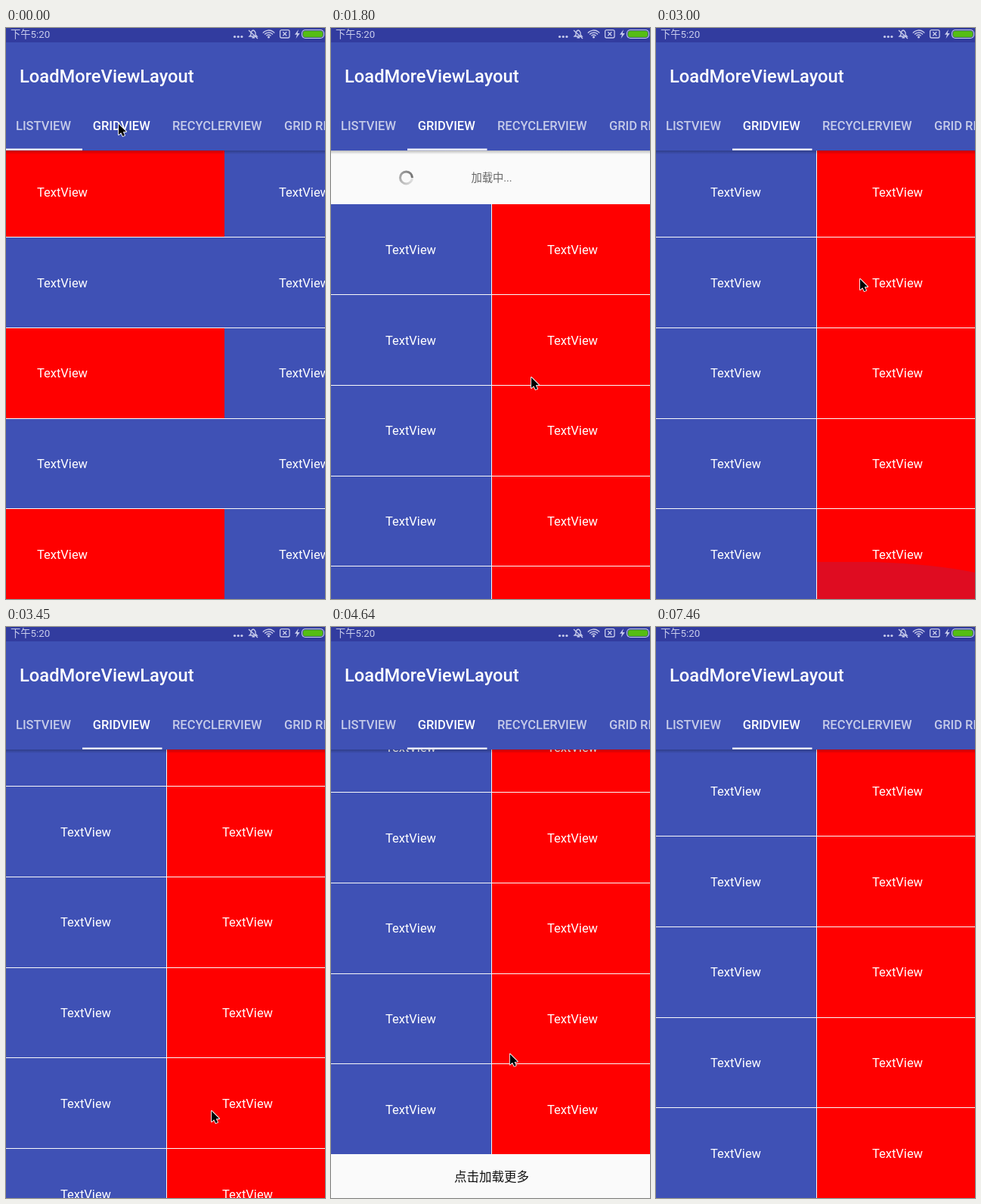
Recreate the animation shown at these times as an HTML page with a canvas. Size 422 by 755 pixels, loop 7.71 s.

```html
<!DOCTYPE html>
<html lang="zh">
<head>
<meta charset="utf-8">
<title>LoadMoreViewLayout</title>
<style>
  html, body { margin: 0; width: 100%; height: 100%; overflow: hidden; background: #fafafa; }
  canvas { display: block; width: 100vw; height: 100vh; }
</style>
</head>
<body>
<canvas id="stage"></canvas>
<script>
const W = 422, H = 755, LOOP = 7710;
const BLUE = '#3f51b5', RED = '#ff0000', PAPER = '#fafafa';
const LATIN = 'Roboto, "Noto Sans", sans-serif';
const CJK = 'Roboto, "Noto Sans CJK SC", "Noto Sans CJK", sans-serif';
const BAR_BOTTOM = 162, LIST_TOP = 157.4, ROW = 119.75, ROWS = 10;

const canvas = document.getElementById('stage');
const ctx = canvas.getContext('2d');

// Each move: first step, last step, value to reach.
const PULL = [[4, 7, 113.6], [9, 11, 76], [15, 18, 0]];
const SCROLL = [...PULL, [20, 26, -726.7], [29, 31, -656.7], [39, 45, 0]];
const POINTER = [
  [1, 6, 257, 474], [7, 12, 265, 462], [16, 19, 268, 700], [19, 20, 270, 332],
  [22, 23, 272, 640], [23, 26, 264, 363], [30, 33, 215, 726], [34, 37, 286, 568],
  [39, 42, 292, 790]
];
const HEADER = [[0, '下拉刷新'], [6, '释放刷新'], [11, '加载中...'], [15, '刷新成功']];
const FOOTER = [[0, '点击加载更多'], [34, '正在加载...'], [38, '加载成功']];

// The picture holds between steps of about 150 ms.
function stepAt(t) {
  if (t < 3300) return Math.floor(t / 150);
  const count = (from, max) => Math.min(max, Math.floor((t - from + 6) / 148.67));
  if (t < 6120) return 22 + count(3300, 15);
  return t < 6420 ? 38 : 39 + count(6420, 7);
}

const easeOut = p => 1 - (1 - p) ** 2;

function glide(rest, moves, step) {
  let values = rest;
  for (const [from, to, ...goal] of moves) {
    if (step <= from) break;
    const p = easeOut(Math.min(1, (step - from) / (to - from)));
    values = values.map((v, i) => v + (goal[i] - v) * p);
  }
  return values;
}

const held = (captions, step) => captions.filter(c => c[0] <= step).pop()[1];

function rect(color, x, y, w, h) {
  ctx.fillStyle = color;
  ctx.fillRect(x, y, w, h);
}

function text(str, x, y, font, color = '#fff', align = 'left') {
  ctx.font = font;
  ctx.fillStyle = color;
  ctx.textAlign = align;
  ctx.fillText(str, x, y);
}

function line(...points) {
  ctx.beginPath();
  points.forEach(([x, y], i) => i ? ctx.lineTo(x, y) : ctx.moveTo(x, y));
}

function dot(x, y, r) {
  ctx.beginPath();
  ctx.arc(x, y, r, 0, Math.PI * 2);
  ctx.fill();
}

// Rows snap to whole pixels and leave a one pixel divider below.
function cell(color, x, top, w, labelX) {
  const y = Math.round(top);
  rect(color, x, y, w, Math.round(top + ROW) - 1 - y);
  text('TextView', labelX, top + 65.4, '16.5px ' + LATIN, '#fff', 'center');
}

function drawListPage(x) {
  for (let r = 0; r < 5; r++) {
    cell(r % 2 ? BLUE : RED, x, LIST_TOP + r * ROW, W, x + 207.5);
  }
}

function drawPullArrow(y, angle) {
  ctx.save();
  ctx.translate(100, y);
  ctx.rotate(angle);
  for (let i = 0; i < 5; i++) {
    rect(`rgba(150,150,150,${.15 + i * .13})`, -3, -11 + i * 3, 6, 2.3);
  }
  ctx.fillStyle = '#b4b4b4';
  line([-7, 3], [7, 3], [0, 11]);
  ctx.fill();
  ctx.restore();
}

function drawSpinner(y, angle) {
  const shade = ctx.createConicGradient(angle, 99.5, y);
  shade.addColorStop(0, '#e6e6e6');
  shade.addColorStop(1, '#707070');
  ctx.strokeStyle = shade;
  ctx.lineWidth = 3;
  ctx.beginPath();
  ctx.arc(99.5, y, 8, 0, Math.PI * 2);
  ctx.stroke();
}

function drawPullHeader(step, y) {
  text(held(HEADER, step), 212.5, y + 5.2, '14.3px ' + CJK, '#666', 'center');
  if (step < 11) drawPullArrow(y, -Math.PI * Math.min(1, Math.max(0, (step - 5.9) * 1.1)));
  else if (step < 15) drawSpinner(y, (step - 12) * 1.7);
}

function drawRipple() {
  ctx.fillStyle = 'rgba(40,80,220,.15)';
  line([213, H], [213, 706], [290, 706]);
  ctx.quadraticCurveTo(370, 709, W, 720);
  ctx.lineTo(W, H);
  ctx.fill();
}

function drawGridPage(step, x) {
  const [offset] = glide([0], SCROLL, step), top = LIST_TOP + offset;
  ctx.save();
  ctx.translate(Math.round(x), 0);
  if (offset > 0) drawPullHeader(step, top - 35.5);
  for (let r = 0; r < ROWS; r++) {
    const y = top + r * ROW;
    cell(BLUE, 0, y, 212, 105.5);
    cell(RED, 213, y, 209, 319.5);
  }
  text(held(FOOTER, step), 212.5, top + ROWS * ROW + 34.3, '500 16.5px ' + CJK, '#111', 'center');
  if (step === 20) drawRipple();
  ctx.restore();
}

function drawBell(x, y) {
  line([x - 5, y + 3], [x - 3, y + 1], [x - 3, y - 2]);
  ctx.quadraticCurveTo(x, y - 8, x + 3, y - 2);
  ctx.lineTo(x + 3, y + 1);
  ctx.lineTo(x + 5, y + 3);
  ctx.closePath();
  ctx.stroke();
  line([x - 6, y - 5], [x + 6, y + 6]);
  ctx.stroke();
  ctx.fillRect(x - 1.5, y + 4, 3.5, 1.6);
}

function drawWifi(x, y) {
  for (const r of [4, 7, 10]) {
    ctx.beginPath();
    ctx.arc(x, y, r, -Math.PI * .78, -Math.PI * .22);
    ctx.stroke();
  }
  dot(x, y - 1, 1.5);
}

function drawCrossedBox(x, y) {
  ctx.beginPath();
  ctx.roundRect(x - 6.2, y - 5.2, 12.4, 10.4, 2);
  ctx.stroke();
  for (const d of [2.5, -2.5]) {
    line([x - 2.5, y - d], [x + 2.5, y + d]);
    ctx.stroke();
  }
}

function pill(color, x, y, w, h) {
  ctx.fillStyle = color;
  ctx.beginPath();
  ctx.roundRect(x, y, w, h, h / 2.4);
  ctx.fill();
}

function drawStatusBar() {
  const ink = '#c9cdec', base = '#323c9f';
  rect(base, 0, 0, W, 19);
  text('下午5:20', 6, 13, '13.3px ' + CJK, ink);
  ctx.strokeStyle = ink;
  ctx.lineWidth = 1.3;
  for (let i = 0; i < 3; i++) dot(302.5 + i * 4.7, 11.5, 1.6);
  drawBell(327, 8);
  drawWifi(347.5, 13);
  drawCrossedBox(368.8, 7.8);
  line([387, 2], [382, 8.7], [385, 8.7], [383.5, 14], [388.7, 7], [385.6, 7]);
  ctx.fill();
  pill(ink, 391, 2, 30, 12);
  pill(base, 392, 3, 28, 10);
  pill('#55bd14', 392.8, 3.8, 26.4, 8.4);
}

function drawAppBar(indicator) {
  const shadow = ctx.createLinearGradient(0, BAR_BOTTOM, 0, BAR_BOTTOM + 5);
  shadow.addColorStop(0, 'rgba(0,0,0,.24)');
  shadow.addColorStop(1, 'rgba(0,0,0,0)');
  rect(shadow, 0, BAR_BOTTOM, W, 5);
  rect(BLUE, 0, 0, W, BAR_BOTTOM);
  drawStatusBar();
  text('LoadMoreViewLayout', 18, 71.5, '500 23.7px ' + LATIN);
  const tabs = [['LISTVIEW', 13], ['GRIDVIEW', 114.7], ['RECYCLERVIEW', 220], ['GRID RECYCLERVIEW', 368]];
  tabs.forEach(([label, x], i) =>
    text(label, x, 135, '500 16.5px ' + LATIN, i === 1 ? '#fff' : 'rgba(255,255,255,.7)'));
  rect('#fff', 101 * indicator, 159.5, 101 + 4.5 * indicator, 2.2);
}

function drawPointer(x, y) {
  ctx.save();
  ctx.translate(x, y);
  line([0, 0], [0, 14], [3.2, 11.2], [5.6, 16], [8, 15], [5.8, 10.3], [10, 10]);
  ctx.closePath();
  ctx.lineJoin = 'round';
  ctx.lineWidth = 1.8;
  ctx.strokeStyle = '#fff';
  ctx.stroke();
  ctx.fillStyle = '#000';
  ctx.fill();
  ctx.restore();
}

function draw(step) {
  const [slide] = glide([.315], [[0, 2, 1]], step);
  ctx.setTransform(canvas.width / W, 0, 0, canvas.height / H, 0, 0);
  rect(PAPER, 0, 0, W, H);
  if (slide < 1) drawListPage(Math.round(-slide * W));
  drawGridPage(step, (1 - slide) * W);
  drawAppBar(step ? slide : 0);
  drawPointer(...glide([149, 127], POINTER, step));
}

function resize() {
  const ratio = window.devicePixelRatio || 1;
  canvas.width = Math.round(innerWidth * ratio);
  canvas.height = Math.round(innerHeight * ratio);
}

const start = performance.now();
function tick() {
  draw(stepAt((performance.now() - start) % LOOP));
  requestAnimationFrame(tick);
}

addEventListener('resize', resize);
resize();
tick();
</script>
</body>
</html>
```
